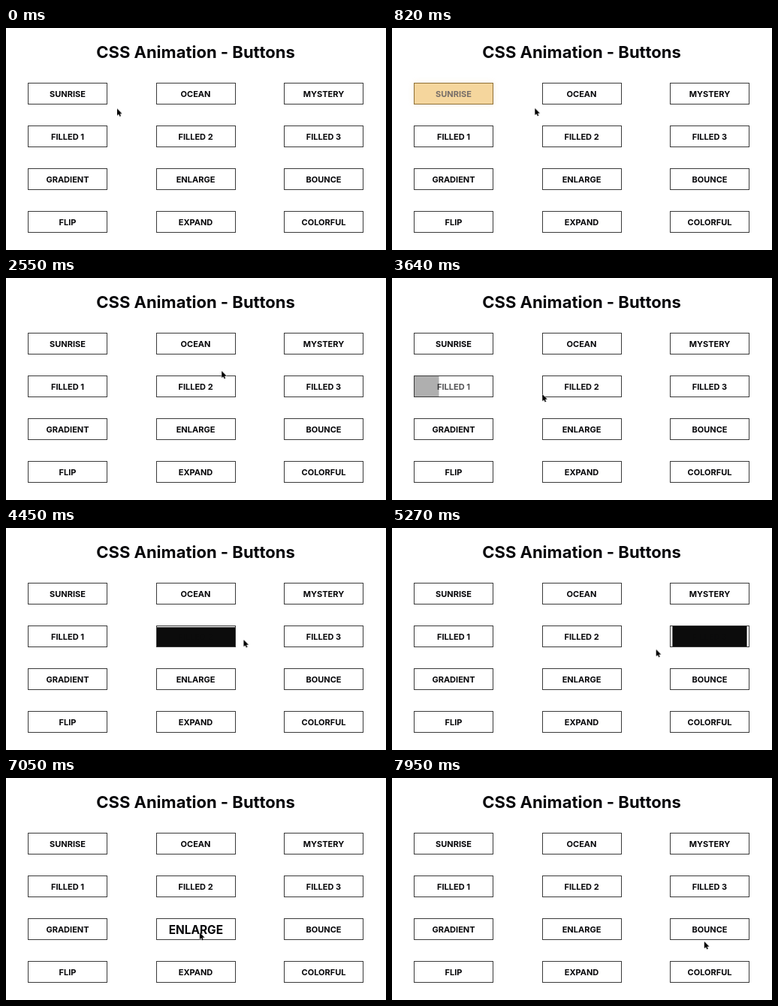
Recreate the animation shown at these times as an HTML page. Size 506 px wide and 296 px high, loop 8 s.

```html
<!DOCTYPE html>
<html lang="en">
<head>
<meta charset="utf-8">
<title>CSS Animation - Buttons</title>
<style>
/* --p is the hover progress of a button, --z lifts a fill above its label */
@property --p { syntax: "<number>"; inherits: true; initial-value: 0; }
@property --z { syntax: "<integer>"; inherits: true; initial-value: 0; }

html, body { margin: 0; width: 100%; height: 100%; overflow: hidden; background: #fff; }
body { position: relative; font-family: Inter, "Open Sans", sans-serif; color: #060609; }

h1 {
  position: absolute; left: 0; top: 15.5px; width: 505px; margin: 0;
  font-size: 22px; line-height: 32px; font-weight: 700; text-align: center; white-space: nowrap;
}
main {
  position: absolute; left: 29px; top: 73px;
  display: grid; grid-template-columns: repeat(3, 106px); column-gap: 64.5px;
  grid-auto-rows: 29px; row-gap: 28.1px;
}
.btn {
  position: relative; z-index: 0; box-sizing: border-box; border: 1px solid #3a3a3a;
  display: flex; align-items: center; justify-content: center;
  font-size: 11px; line-height: 14px; font-weight: 700;
  animation: 8s ease infinite;
}
.btn span {
  position: relative; z-index: 1;
  color: color-mix(in srgb, var(--ink, #fff) calc(var(--p) * 100%), #060609);
}
.btn::before { content: ""; position: absolute; }

.glow::before {
  inset: -1px; background: var(--tint); opacity: var(--p);
  box-shadow: 0 0 10px color-mix(in srgb, var(--tint) 25%, transparent);
}
.fill::before { inset: 0; background: #000; opacity: var(--p); z-index: var(--z); }

.sunrise { --tint: #ecaa32; --ink: #f3e0d0; animation-name: sunrise; }
.ocean { --tint: #1d3160; animation-name: ocean; }
.mystery { --tint: #5b2a86; animation-name: mystery; }
.left { animation-name: left; }
.left::before { transform: scaleX(var(--p)); transform-origin: left; }
.rise { animation-name: rise; }
.rise::before { transform: scaleY(var(--p)); transform-origin: bottom; }
.center { animation-name: center; }
.center::before { transform: scaleX(var(--p)); }
.gradient { animation-name: gradient; }
.gradient::before {
  inset: 0; background: linear-gradient(90deg, #000 34%, #fff 66%);
  background-size: 300% 100%; background-position: calc((1 - var(--p)) * 100%) 0;
}
.enlarge { animation-name: enlarge; }
.enlarge span { color: inherit; transform: scale(calc(1 + .4 * var(--p))); }

@keyframes sunrise { 0%, 1.5% { --p: 0 } 5.25%, 9.1% { --p: 1 } 12.9%, 100% { --p: 0 } }
@keyframes ocean { 0%, 11.25% { --p: 0 } 15%, 18.4% { --p: 1 } 22.2%, 100% { --p: 0 } }
@keyframes mystery { 0%, 21.75% { --p: 0 } 25.5%, 28.1% { --p: 1 } 31.9%, 100% { --p: 0 } }
@keyframes left {
  0%, 35.75% { --p: 0 } 39.5%, 44% { --p: 1 } 47.75%, 100% { --p: 0 }
  0%, 44% { --z: 0 } 44.01%, 100% { --z: 2 }
}
@keyframes rise {
  0%, 45.4% { --p: 0 } 49.2%, 55.4% { --p: 1 } 59.1%, 100% { --p: 0 }
  0%, 55.4% { --z: 0 } 55.41%, 100% { --z: 2 }
}
@keyframes center {
  0%, 56.75% { --p: 0 } 60.5%, 65.65% { --p: 1 } 69.4%, 100% { --p: 0 }
  0%, 65.65% { --z: 0 } 65.66%, 100% { --z: 2 }
}
@keyframes gradient { 0%, 70.9% { --p: 0 } 74.6%, 80.5% { --p: 1 } 84.2%, 100% { --p: 0 } }
@keyframes enlarge { 0%, 82% { --p: 0 } 85.75%, 94.5% { --p: 1 } 98.2%, 100% { --p: 0 } }

.cursor {
  position: absolute; left: 0; top: 0; width: 9px; height: 13px; overflow: visible; z-index: 5;
  animation: cursor 8s linear infinite;
}
@keyframes cursor {
  0%, .5% { transform: translate(148px, 107.5px) }
  1.5% { transform: translate(134px, 101px) }
  3% { transform: translate(115px, 94px) }
  5.5% { transform: translate(104px, 91px) }
  7.5% { transform: translate(112px, 93px) }
  9.1% { transform: translate(135px, 99px) }
  10.25% { transform: translate(190px, 107px) }
  11.25% { transform: translate(213px, 101px) }
  13% { transform: translate(243px, 95px) }
  16% { transform: translate(266px, 94px) }
  18.4% { transform: translate(305px, 98px) }
  21% { transform: translate(377px, 104px) }
  21.75% { transform: translate(389px, 101px) }
  23.5% { transform: translate(410px, 95px) }
  26% { transform: translate(418px, 94px) }
  28.1% { transform: translate(398px, 101px) }
  31% { transform: translate(328px, 118px) }
  34% { transform: translate(190px, 138px) }
  35.75% { transform: translate(134px, 146px) }
  38% { transform: translate(105px, 150px) }
  40.4%, 42.6% { transform: translate(98px, 151px) }
  44% { transform: translate(134px, 153px) }
  45.5% { transform: translate(200px, 155px) }
  48% { transform: translate(240px, 151px) }
  52.2%, 52.9% { transform: translate(258px, 149px) }
  55.4% { transform: translate(305px, 149px) }
  56.75% { transform: translate(370px, 149px) }
  59% { transform: translate(410px, 149px) }
  62.5%, 63.1% { transform: translate(416px, 150px) }
  65.5% { transform: translate(372px, 158px) }
  65.9% { transform: translate(351px, 162px) }
  68.5% { transform: translate(230px, 186px) }
  70.9% { transform: translate(134px, 203px) }
  73% { transform: translate(102px, 206px) }
  76.5% { transform: translate(95px, 206px) }
  79.5% { transform: translate(111px, 210px) }
  80.5% { transform: translate(134px, 210px) }
  82% { transform: translate(200px, 208px) }
  85% { transform: translate(242px, 206px) }
  89.75%, 92.6% { transform: translate(266px, 206px) }
  94.5% { transform: translate(305px, 211px) }
  97% { transform: translate(375px, 217px) }
  99.4%, 100% { transform: translate(416px, 218px) }
}
</style>
</head>
<body>
<h1>CSS Animation - Buttons</h1>
<main>
  <div class="btn glow sunrise"><span>SUNRISE</span></div>
  <div class="btn glow ocean"><span>OCEAN</span></div>
  <div class="btn glow mystery"><span>MYSTERY</span></div>
  <div class="btn fill left"><span>FILLED 1</span></div>
  <div class="btn fill rise"><span>FILLED 2</span></div>
  <div class="btn fill center"><span>FILLED 3</span></div>
  <div class="btn gradient"><span>GRADIENT</span></div>
  <div class="btn enlarge"><span>ENLARGE</span></div>
  <div class="btn"><span>BOUNCE</span></div>
  <div class="btn"><span>FLIP</span></div>
  <div class="btn"><span>EXPAND</span></div>
  <div class="btn"><span>COLORFUL</span></div>
</main>
<svg class="cursor" viewBox="0 0 9 13">
  <path d="M0 0V9.2L2.1 7.3L3.5 10.4L5 9.7L3.7 6.7H6.6Z" stroke="#fff" stroke-width=".8" paint-order="stroke"/>
</svg>
</body>
</html>
```
